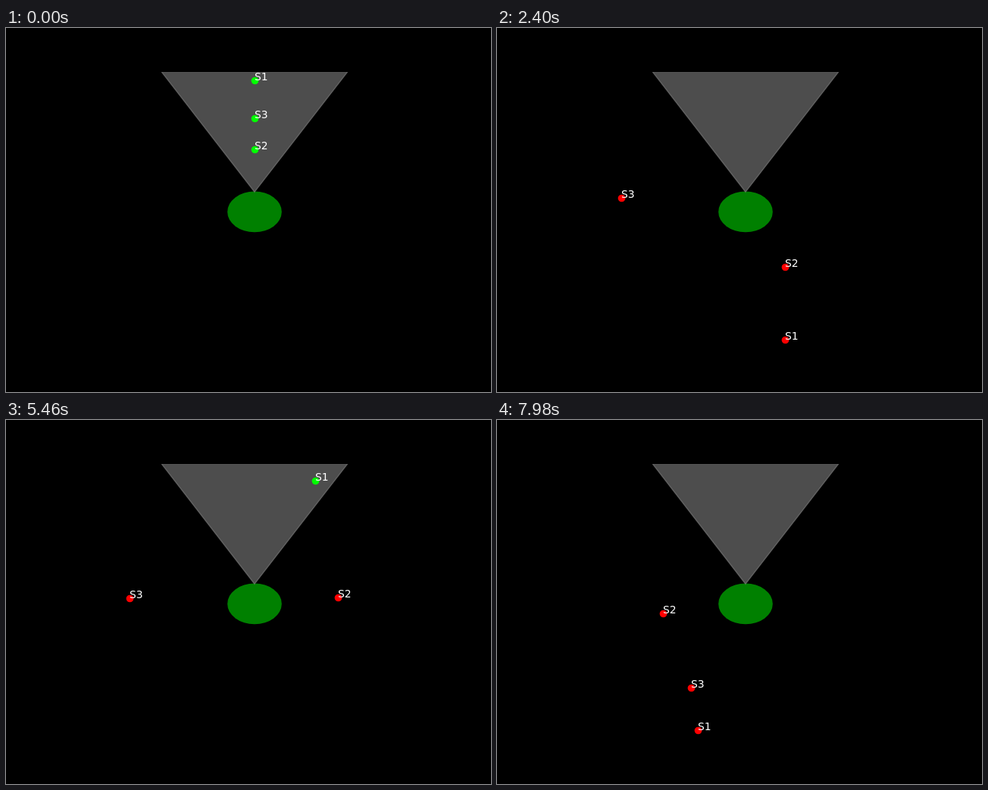
An HTML page with a canvas for the animation above (8000 ms loop, 640 by 480 pixels).

```html
<!DOCTYPE html>
<html lang="en">
<head>
<meta charset="utf-8">
<title>Satellite visibility</title>
<style>
  html, body { margin: 0; width: 100%; height: 100%; overflow: hidden; background: #000; }
  canvas { display: block; }
</style>
</head>
<body>
<canvas id="stage" width="640" height="480"></canvas>
<script>
const ctx = document.getElementById('stage').getContext('2d');

// Lengths in km, angles clockwise from straight up.
const LOOP_MS = 8000, STEP_MS = 60, STEP_SECONDS = 1000;
const MU = 398600.4418, EARTH_RADIUS = 6371, VIEW_LIMIT = 45000;
const HALF_ANGLE_TAN = Math.tan(Math.PI / 6);
const CENTER = { x: 328, y: 242.4 };
const SCALE = { x: 248 / VIEW_LIMIT, y: 184.8 / VIEW_LIMIT };
const LINE = 100 / 72;

const satellites = [
  { name: 'S1', radius: 42164 },
  { name: 'S2', radius: 20000 },
  { name: 'S3', radius: 30000 }
];

const toX = km => CENTER.x + km * SCALE.x;
const toY = km => CENTER.y - km * SCALE.y;

function drawEarth() {
  ctx.fillStyle = '#008000';
  ctx.beginPath();
  ctx.ellipse(CENTER.x, CENTER.y, EARTH_RADIUS * SCALE.x + LINE / 2,
    EARTH_RADIUS * SCALE.y + LINE / 2, 0, 0, 2 * Math.PI);
  ctx.fill();
}

function drawCone() {
  const halfWidth = (VIEW_LIMIT - EARTH_RADIUS) * HALF_ANGLE_TAN;
  ctx.save();
  ctx.beginPath();
  ctx.rect(80, 58, 496, 369);
  ctx.clip();
  ctx.beginPath();
  ctx.moveTo(toX(0), toY(EARTH_RADIUS));
  ctx.lineTo(toX(-halfWidth), toY(VIEW_LIMIT));
  ctx.lineTo(toX(halfWidth), toY(VIEW_LIMIT));
  ctx.closePath();
  ctx.fillStyle = ctx.strokeStyle = 'rgba(128, 128, 128, 0.6)';
  ctx.lineWidth = LINE;
  ctx.fill();
  ctx.stroke();
  ctx.restore();
}

function drawSatellite({ name, radius }, seconds) {
  const angle = Math.sqrt(MU / radius ** 3) * seconds;
  const east = radius * Math.sin(angle), north = radius * Math.cos(angle);
  const visible = Math.abs(east) <= (north - EARTH_RADIUS) * HALF_ANGLE_TAN;
  const x = Math.round(toX(east)), y = Math.round(toY(north));

  ctx.fillStyle = visible ? '#00ff00' : '#ff0000';
  ctx.beginPath();
  ctx.arc(x + 0.5, y + 0.5, 3.5 * LINE, 0, 2 * Math.PI);
  ctx.fill();
  return { name, x, y };
}

function drawLabel({ name, x, y }) {
  ctx.fillStyle = '#fff';
  ctx.font = `${10 * LINE}px "DejaVu Sans", sans-serif`;
  ctx.fillText(name, x, y);
}

function draw(time) {
  const step = Math.floor((time % LOOP_MS + 0.01) / STEP_MS);
  ctx.fillStyle = '#000';
  ctx.fillRect(0, 0, 640, 480);
  drawEarth();
  drawCone();
  satellites.map(s => drawSatellite(s, step * STEP_SECONDS)).forEach(drawLabel);
}

const start = performance.now();
function tick() {
  draw(performance.now() - start);
  requestAnimationFrame(tick);
}
tick();
</script>
</body>
</html>
```
